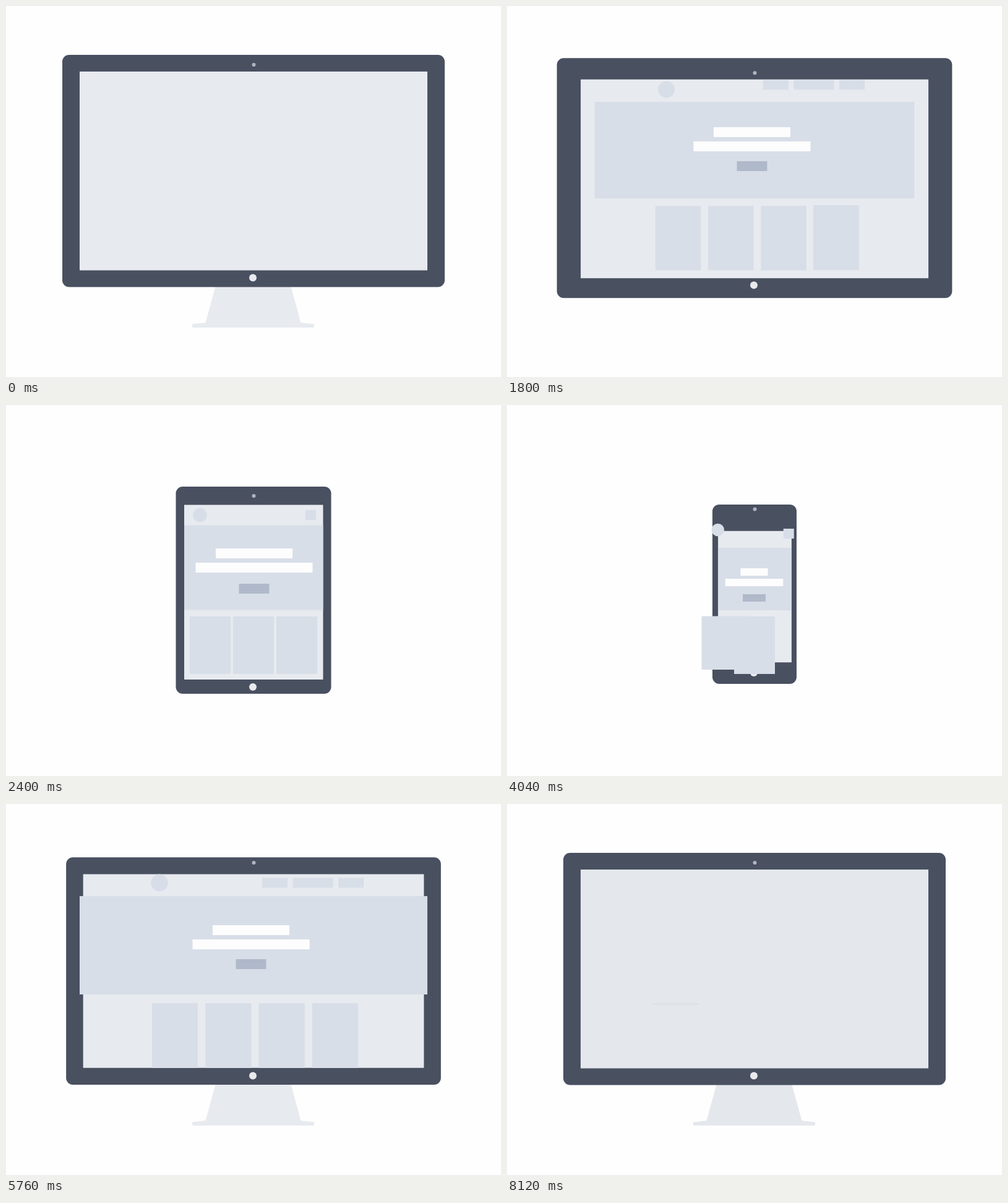
Write an HTML page with a canvas that moves like this. It is 800x600 px and loops after 8660 ms.

```html
<!DOCTYPE html>
<html lang="en">
<head>
<meta charset="utf-8">
<title>Responsive devices</title>
<style>
  html, body { margin: 0; width: 100%; height: 100%; overflow: hidden; background: #fefefe; }
  canvas { display: block; }
</style>
</head>
<body>
<canvas id="stage" width="800" height="600"></canvas>
<script>
const ctx = document.getElementById('stage').getContext('2d');
const LOOP = 8660, STEP = 40, LAST = 8120, REVEAL = 400, OUTRO = 7080, STAGGER = 45;
const MORPHS = [1600, 3760, 5320];           // desktop > tablet > phone > desktop
const DARK = '#495060', LIGHT = '#e7eaef', FADED = '#e4e8ec', BLOCK = '#d8dee8', WHITE = '#fdfdfd';

const clamp = u => Math.min(1, Math.max(0, u));
const ease = u => u < 0.5 ? 4 * u ** 3 : 1 - 4 * (1 - u) ** 3;
const span = (t, from, to) => ease(clamp((t - from) / (to - from)));
const bump = (t, from, length) => Math.sin(Math.PI * clamp((t - from) / length)) ** 2;

// Boxes are [centre x, centre y, width, height].
const DEVICES = [
  {
    body: [400, 266.75, 618, 375.5], screen: [400, 266.75, 562, 321.5],
    lens: 95, home: 439.5, header: 43, hero: 159, logo: 248, menu: 558, wide: true,
    text: { x: 396, rows: [204, 227, 259], widths: [124, 189, 49], size: 16 },
    cards: { count: 4, gap: 86.3, first: [273, 374.5, 74, 105] }
  },
  {
    body: [400, 299.5, 251, 335], screen: [400.25, 302.75, 224.5, 282.5],
    lens: 147, home: 456, header: 33, hero: 137, logo: 313.5, menu: 492.5,
    text: { x: 401, rows: [240, 263, 297], widths: [124, 189, 49], size: 16 },
    cards: { count: 3, gap: 70, first: [330, 388.5, 66, 93] }
  },
  {
    body: [400, 311.5, 134, 271], screen: [400.5, 310, 118, 212],
    lens: 194.5, home: 433, header: 27, hero: 101, logo: 358.5, menu: 443.5,
    text: { x: 399.5, rows: [270, 287, 304], widths: [44, 93.5, 37], size: 12 },
    cards: { count: 1, gap: 0, first: [400, 377.75, 106, 74.5] }
  }
];

function layout({ body, screen, lens, home, header, hero, logo, menu, wide, text, cards }) {
  const top = screen[1] - screen[3] / 2;
  const headerY = top + header / 2;
  const logoSize = 5 + 0.53 * header;
  const boxes = {
    body, screen,
    lens: [400.5, lens, 6, 6],
    home: [399, home, 12, 12],
    logo: [logo, headerY, logoSize, logoSize],
    menu: [menu, headerY, wide ? 0 : 17, wide ? 0 : 16],
    hero: [screen[0], top + header + hero / 2, screen[2], hero]
  };
  let left = 414;
  [41, 65, 41].forEach((w, i) => {
    boxes['nav' + i] = wide ? [left + w / 2, headerY, w, 16] : [menu, headerY, 0, 16];
    left += w + 8.5;
  });
  text.rows.forEach((y, i) => boxes['text' + i] = [text.x, y, text.widths[i], text.size]);
  const [x, y, w, h] = cards.first;
  for (let i = 0; i < 4; i++) {
    const column = Math.min(i, cards.count - 1);
    boxes['card' + i] = [x + cards.gap * column, y, i === column ? w : 0, h];
  }
  return boxes;
}
const LAYOUTS = DEVICES.map(layout);

// Each morph has one [start, end], or three of them for place, width and height.
const tempo = (start, end, shrinkEnd) => [[start, end], [0, shrinkEnd], [0, 430]];
const reshape = [[0, 450], [240, 640], [240, 700]];
const expand = [[0, 600], [0, 540], [0, 600]];
const textTempo = tempo(200, 720, 280);
const cardTempo = i => [[i < 3 ? 0 : 200, 800], i ? [300 * (2 - i), 300 * (2 - i) + 270] : [0, 630], [0, 430]];

const parts = [
  {
    name: 'body', color: DARK, radius: 11, tempo: [reshape, [[0, 545], [0, 334], [0, 484]], expand],
    bumps: [[1600, 640, [0, 0, 30, 18]], [1880, 480, [0, 0, 0, 120]]]
  },
  { name: 'screen', color: LIGHT, tempo: [reshape, [0, 320], expand] },
  { name: 'lens', color: '#b0b5be', radius: 3, tempo: tempo(0, 500, 580) },
  { name: 'home', color: '#e8eaed', radius: 6, tempo: tempo(0, 340, 300) },
  { name: 'logo', color: BLOCK, radius: 14, grow: 'xy', tempo: tempo(0, 600, 520) },
  { name: 'menu', color: BLOCK, grow: 'x', tempo: tempo(200, 600, 460) },
  ...[0, 1, 2].map(i => ({ name: 'nav' + i, color: BLOCK, grow: 'x', tempo: textTempo })),
  { name: 'hero', color: BLOCK, grow: 'y', tempo: tempo(0, 620, 280) },
  ...[WHITE, WHITE, '#b0b9ca'].map((color, i) => ({ name: 'text' + i, color, grow: 'x', tempo: textTempo })),
  ...[0, 1, 2, 3].map(i => ({ name: 'card' + i, color: BLOCK, grow: 'y', tempo: cardTempo(i), leave: 720 - 80 * i }))
];
parts.filter(p => p.grow).forEach((p, n) => {
  p.enter = STAGGER * n;
  p.leave ??= p.enter;
});
parts.find(p => p.name === 'text2').bumps = [[3760, 560, [0, 8, 0, 0]]];

function boxAt({ name, tempo, bumps = [] }, t) {
  const box = [...LAYOUTS[0][name]];
  MORPHS.forEach((start, k) => {
    const next = LAYOUTS[(k + 1) % 3][name];
    const [place, width = place, height = place] = Array.isArray(tempo[k][0]) ? tempo[k] : [tempo[k]];
    [place, place, width, height].forEach(([from, to], i) => {
      box[i] += (next[i] - box[i]) * span(t, start + from, start + to);
    });
  });
  for (const [from, length, amount] of bumps) {
    amount.forEach((a, i) => box[i] += a * bump(t, from, length));
  }
  return box;
}

function drawPart(p, t) {
  let [x, y, w, h] = boxAt(p, t);
  x -= w / 2;
  y -= h / 2;
  let shown = 1;
  if (p.grow) {
    shown = span(t, p.enter, p.enter + REVEAL) - span(t, OUTRO + p.leave, OUTRO + p.leave + REVEAL);
    if (p.grow === 'xy') {
      x += w * (1 - shown) / 2;
      y += h * (1 - shown) / 2;
    }
    if (p.grow.includes('x')) w *= shown;
    if (p.grow.includes('y')) h *= shown;
  }
  if (shown <= 0 || w <= 0 || h <= 0) return;
  ctx.globalAlpha = shown ** 0.2;
  ctx.fillStyle = p.name === 'screen' && t >= LAST ? FADED : p.color;
  ctx.beginPath();
  ctx.roundRect(x, y, w, h, Math.min(p.radius || 0, w / 2, h / 2));
  ctx.fill();
  ctx.globalAlpha = 1;
}

function drawStand(t) {
  const slide = 65 * (span(t, 1600, 1800) - span(t, 5560, 5750));
  if (slide > 64.9) return;
  ctx.fillStyle = t >= LAST ? FADED : LIGHT;
  ctx.beginPath();
  const outline = [[60.5, 452], [77, 512], [98.5, 514.5], [98.5, 520]];
  for (const [x, y] of outline) ctx.lineTo(399.5 + x, y - slide);
  for (const [x, y] of outline.reverse()) ctx.lineTo(399.5 - x, y - slide);
  ctx.fill();
}

function frame() {
  const now = performance.now() % LOOP;
  const t = Math.min(LAST, Math.floor(now / STEP) * STEP);
  ctx.fillStyle = '#fefefe';
  ctx.fillRect(0, 0, 800, 600);
  drawStand(t);
  for (const p of parts) drawPart(p, t);
  requestAnimationFrame(frame);
}
frame();
</script>
</body>
</html>
```
